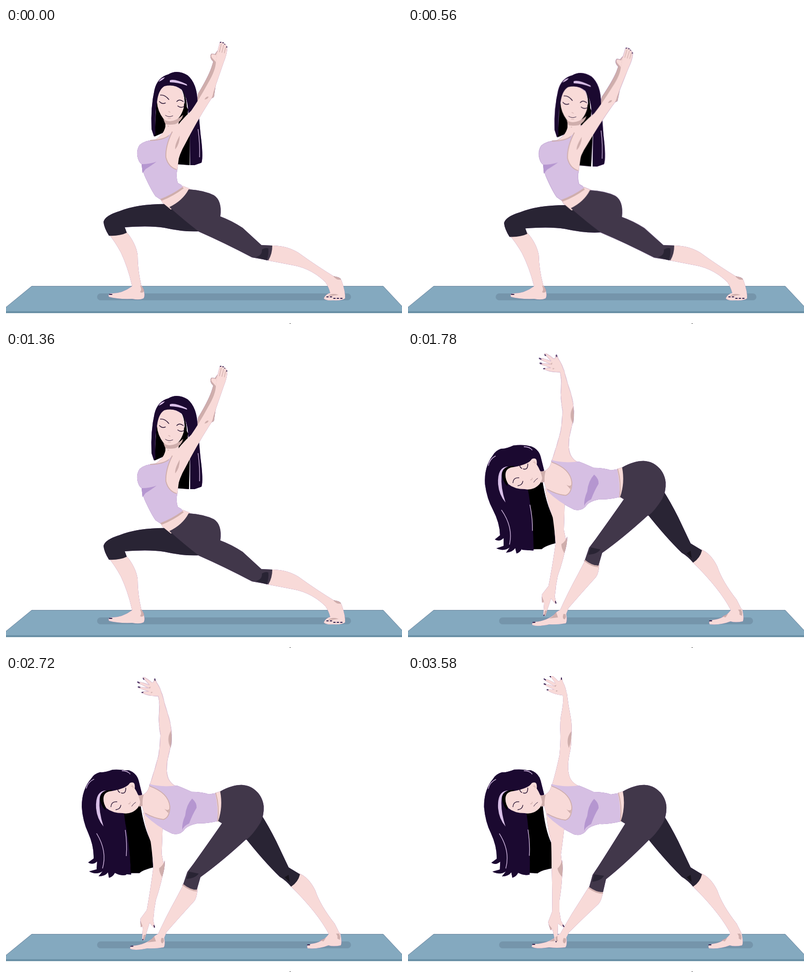
Write an HTML page without scripts that moves like this. It is 800 px wide and 600 px high and loops after 3.6 s.

```html
<!DOCTYPE html>
<html lang="en">
<head>
<meta charset="utf-8">
<title>Yoga flow</title>
<style>
@property --lunge { syntax: "<number>"; inherits: true; initial-value: 0; }
@property --reach { syntax: "<number>"; inherits: true; initial-value: 0; }
@property --sway { syntax: "<number>"; inherits: true; initial-value: 0; }
html, body { margin: 0; width: 100%; height: 100%; overflow: hidden; background: #fff; }
svg {
  display: block; width: 100vw; height: 100vh;
  animation: lunge 3.6s infinite, reach 3.6s infinite, sway 3.6s ease-in-out infinite;
}
.pose { filter: drop-shadow(0 0 .5px #7d4fa3); animation: 3.6s step-end infinite; }
#warrior { animation-name: first; }
#triangle { animation-name: second; }

.skin { fill: #f8dad8; }
.shade { fill: #cfaeac; }
.top { fill: #d6bfe3; }
.fold { fill: #b596d0; }
.near { fill: #41374a; }
.far { fill: #292434; }
.hair { fill: #1b0930; }
.shine { fill: #d9bfe8; }
.line { fill: none; stroke: #24102f; stroke-width: 1.4; stroke-linecap: round; }
.fine { stroke-width: .9; }
.crease { fill: none; stroke: #cfaeac; stroke-width: 1.8; }
.crease.fine { stroke-width: 1.2; }
.thin { fill: none; stroke: #d9bfe8; stroke-width: 1.3; }
.nail { fill: none; stroke: #32204d; stroke-width: 1.9; stroke-linecap: round; }

.shadow { transform-origin: 440.5px 545px; transform: scaleX(calc(1 + .027 * var(--lunge))); }
.hips { transform-origin: 525px 455px; transform: rotate(calc(-.67deg * var(--lunge))); }
.trunk { transform-origin: 335px 340px; transform: translate(calc(-2px * var(--lunge)), calc(2px * var(--lunge))) rotate(calc(.9deg * var(--lunge))); }
.head { transform: translateX(calc(2px * var(--lunge))); }
.panel { transform-origin: 350px 190px; transform: skewX(calc(1.4deg * var(--sway))); }
.arms { transform-origin: 340px 225px; transform: rotate(calc(1.5deg * var(--lunge))) scaleY(calc(1 - .03 * var(--lunge))); }
.thigh { transform: translate(calc(-3px * var(--lunge)), calc(2.3px * var(--lunge))); }
.shin { transform-origin: 270px 525px; transform: rotate(calc(-1.6deg * var(--lunge))); }

.locks { transform-origin: 205px 225px; transform: rotate(calc(-3.5deg * var(--sway))); }
.drape { transform-origin: 258px 270px; transform: rotate(calc(-5deg * var(--reach))); }
.high { transform-origin: 316px 215px; transform: rotate(calc(3.6deg * var(--reach))); }
.high2 { transform-origin: 319px 118px; transform: rotate(calc(-13.6deg * var(--reach))); }
.low { transform-origin: 297px 300px; transform: rotate(calc(-7.5deg * var(--reach))); }
.low2 { transform-origin: 301px 387px; transform: rotate(calc(21deg * var(--reach))); }
.low3 { transform-origin: 298px 482px; transform: rotate(calc(9deg * var(--reach))); }
.chest { transform-origin: 345px 222px; transform: scaleY(calc(1 - .025 * var(--reach))); }
.seat { transform: translateX(calc(-2px * var(--reach))); }
.thigh2 { transform-origin: 480px 270px; transform: rotate(calc(4.3deg * var(--reach))); }
.shin2 { transform-origin: 312px 527px; transform: rotate(calc(-6.2deg * var(--reach))); }
.foot2 { transform-origin: 318px 538px; transform: rotate(calc(-5deg * var(--reach))); }
.foot3 { transform: translateX(calc(2px * var(--reach))); }

@keyframes first { 0% { visibility: visible; } 45.5%, 100% { visibility: hidden; } }
@keyframes second { 0% { visibility: hidden; } 45.5%, 100% { visibility: visible; } }
@keyframes lunge {
  0% { --lunge: 0; animation-timing-function: ease; }
  15.3% { --lunge: 1; animation-timing-function: ease; }
  30.5%, 100% { --lunge: 0; }
}
@keyframes reach {
  0%, 45.5% { --reach: 0; animation-timing-function: cubic-bezier(.1, .75, .3, 1); }
  62.2% { --reach: 1; animation-timing-function: cubic-bezier(.7, 0, .9, .25); }
  78.9%, 100% { --reach: 0; }
}
@keyframes sway {
  0%, 33%, 45.5% { --sway: 0; }
  12%, 22% { --sway: -1; }
  40% { --sway: -.8; }
  49.4% { --sway: 1; }
  65%, 83% { --sway: 0; }
  99%, 100% { --sway: .25; }
}
</style>
</head>
<body>
<svg viewBox="0 0 800 600">
  <path fill="#84a9bf" d="M52 523H762L800 564V575H0V566z"/>
  <path fill="#6a90a6" d="M0 574H800V578H0z"/>
  <path fill="none" stroke="#5f7792" stroke-width=".8" d="M0 566L52 523.4H762L800 564"/>
  <rect class="shadow" x="184" y="538" width="513" height="14" rx="7" fill="#7595ab"/>
  <path fill="#222" d="M573 599h2v1h-2z"/>

  <g id="warrior" class="pose">
    <g class="shin">
      <path class="skin" d="M207 417Q228 415 243 413Q262 435 266 460Q266 490 273 520L276 532H256L254 520Q246 485 232 455Q220 433 207 417z"/>
    </g>
    <path class="skin" d="M254 524Q262 517 274 522Q283 540 278 548Q270 552 255 549Q225 550 208 545Q205 538 214 538Q235 538 254 524z"/>
    <path class="shade" d="M273 522Q281 531 278 535Q273 538 271 535Q275 530 271 523z"/>
    <path class="nail" d="M209 540h5"/>
    <path class="far thigh" d="M335 357Q270 355 230 371Q200 380 197 393Q198 405 208 421Q230 422 244 415L240 404Q290 400 320 405Q360 414 392 412L375 385z"/>

    <path class="skin" d="M534 441Q565 440 590 455Q630 484 665 505L677 512L650 520Q620 488 580 481L528 471z"/>
    <path class="skin" d="M645 515L660 503Q676 506 678 512Q686 535 685 548Q680 553 660 552Q645 553 642 548Q645 540 655 537Q652 525 645 515z"/>
    <path class="shade" d="M661 503Q676 505 677 510Q668 512 661 503zM650 543Q660 536 672 541L658 543z"/>
    <path class="nail" stroke-dasharray="3 4" d="M648 545h10m4 3h18"/>

    <g class="trunk">
      <g class="head">
        <path class="panel" d="M350 180L370 180L372 200L371 278L345 276L352 240z"/>
        <path d="M304 145L300 220L318 212L330 195H365L368 165L340 120z"/>
      </g>
      <path class="skin" d="M322 186H350Q346 200 352 240L346 289L322 280L298 228Q318 218 322 200z"/>
      <g class="arms">
        <path class="shade" d="M384 160L388 133Q408 100 415 80L420 64L432 60L420 140z"/>
        <path class="shade" d="M425 76L415 64Q411 57 415 52L422 53L427 46V70z"/>
        <path class="skin" d="M424 69L416 60Q413 55 417 53L424 55L427 47z"/>
      </g>
      <g class="head">
        <path class="skin" d="M305 150Q305 126 320 117Q340 112 355 127Q362 145 359 162Q352 186 335 192Q324 192 318 184Q306 168 305 150z"/>
        <path class="shade" d="M318 185Q335 196 358 176Q355 189 342 195Q330 197 322 195zM326 199l3 1v-2z"/>
        <path class="hair" d="M305 150Q308 125 320 118Q340 113 355 125Q366 140 368 165L372 205V278L381 278L395 273Q399 260 393 215L387 150Q386 112 367 96Q346 83 328 94Q306 100 300 125Q292 160 294 205L299 220L302 215Q300 175 305 150z"/>
        <path class="shine" d="M308 109Q313 101 321 100Q317 106 308 109zM331 106Q340 102 365 114L366 117Q347 110 331 110z"/>
        <path class="thin" d="M388 205Q392 235 391 262"/>
        <path d="M355 124Q367 142 365 170L358 172Q365 145 355 124z"/>
        <path class="line" d="M312 136Q321 135 329 145M345 149Q350 143 358 149M310 149Q315 155 322 152M347 158Q353 163 360 159"/>
        <path class="line fine" d="M322 177Q329 182 337 178"/>
        <path class="crease fine" d="M328 169l4 2M327 183h6"/>
      </g>
      <path class="skin" d="M311 345L357 320L372 326Q362 354 333 368L316 354z"/>
      <path class="shade" d="M310 346L356 321L359 325Q338 341 315 350z"/>
      <path class="top" d="M270 237Q264 245 265 258Q267 272 275 277Q276 292 282 304Q294 330 302 341L311 347Q335 338 357 322L354 318L347 314Q343 301 346 287Q328 282 323 262Q322 238 336 210Q326 224 300 227Q282 227 270 237z"/>
      <path class="crease" d="M336 210Q322 238 323 262Q328 282 345 287M291 228Q318 227 329 218"/>
      <path class="fold" d="M274 276Q290 276 304 271Q292 280 282 286L276 294z"/>
      <g class="arms">
        <path class="skin" d="M424 68Q424 85 408 112Q390 145 374 168Q352 188 338 210L330 250L345 280Q350 255 362 235Q385 190 411 149Q417 142 419 130L440 69Q447 52 447 39L445 35L441 31L437 28L432 29L427 48z"/>
        <path class="shade" d="M401 145Q404 138 409 139Q409 144 401 145zM342 246Q340 238 351 218Q351 235 342 246z"/>
        <path class="crease fine" d="M431 49L435 32M436 50L440 34M441 51L444 38"/>
        <path class="nail" d="M433 29h1M438 30h1M442 33h0M446 38v1"/>
      </g>
    </g>
    <g class="hips">
      <path class="near" d="M369 327Q400 329 420 339Q437 350 433 382Q455 390 478 405L516 440L538 441Q538 458 530 471L497 465Q440 435 390 413Q360 390 330 363Q357 350 369 327z"/>
      <path class="far" d="M517 449Q525 444 530 447Q531 460 527 471L505 464Q518 461 517 449z"/>
    </g>
  </g>

  <g id="triangle" class="pose">
    <g class="drape">
      <path class="hair" d="M205 270H245V402L222 399z"/>
      <path d="M236 275L272 260Q276 310 290 340V390Q268 394 262 400L244 399Q247 340 236 275z"/>
    </g>
    <g class="locks">
      <path class="hair" d="M262 203Q250 188 215 190Q200 196 190 195Q178 198 172 208Q153 230 153 265Q155 295 166 318Q178 345 177 370L166 378Q175 384 184 376L183 392L168 396Q182 404 195 396L187 406Q200 406 206 398L208 409Q216 407 220 399Q232 406 243 403Q246 350 240 290L238 275L250 240L262 203z"/>
      <path class="thin" d="M183 319Q205 355 195 390M162 228Q165 215 178 209M241 312Q245 340 243 365"/>
    </g>
    <path class="hair" d="M225 192L248 191Q264 197 268 212L275 240L271 244L250 228z"/>
    <path class="thin" d="M234 192Q246 192 251 199"/>
    <path class="shine" d="M203 232Q190 235 189 250Q187 275 197 305Q184 290 182 268Q180 232 203 232z"/>
    <path d="M190 245Q194 230 215 231L200 250L201 272Q190 262 190 245z"/>
    <g class="foot3">
      <path class="skin" d="M652 521Q665 512 674 522Q678 540 675 546Q660 549 650 546Q630 554 608 552Q604 545 615 543Q640 540 652 521z"/>
      <path class="shade" d="M667 518Q676 524 673 535L668 532Q670 526 663 520zM633 536L645 531L640 538z"/>
      <path class="nail" d="M608 545h4"/>
    </g>
    <path class="skin" d="M592 400Q612 408 625 435Q635 465 664 502L674 522L652 523Q630 480 574 425z"/>
    <path class="far" d="M515 280Q530 303 546 335L571 388L594 402Q590 418 576 427Q565 414 553 407Q520 375 480 324z"/>
    <path fill="#17131c" d="M563 408L571 403L573 418z"/>

    <g class="low">
      <path class="skin" d="M279 275Q292 280 317 298Q312 340 309 362L312 390H290Q290 350 289 335Q282 310 279 275z"/>
      <g class="low2">
        <path class="skin" d="M290 380L312 384Q312 420 306 455V485H291Q292 440 290 380z"/>
        <path class="shade" d="M311 373Q314 390 311 407Q303 398 302 390Q309 384 311 373z"/>
      </g>
    </g>
    <g class="foot2">
      <path class="skin" d="M301 526Q315 516 320 530Q322 545 318 550Q300 552 285 550Q260 554 250 549Q249 542 262 543Q288 540 301 526z"/>
      <path class="shade" d="M317 526Q322 538 316 542Q311 540 314 532zM285 538Q294 534 300 526L303 537z"/>
      <path class="nail" d="M252 544h4"/>
    </g>
    <g class="shin2">
      <path class="skin" d="M365 428Q380 437 394 437Q391 456 385 462Q350 495 325 520L319 532L304 529Q325 490 350 452z"/>
    </g>
    <g class="low">
      <g class="low2">
        <g class="low3">
          <path class="skin" d="M291 478H306L309 496L316 508L313 509L303 502L302 538Q299 542 297 537L292 514L288 515L283 499z"/>
          <path class="shade" d="M284 503L291 512L288 515zM298 529l4-2v11l-3 2z"/>
          <path class="nail" d="M313 505l2 3M299 538v1"/>
        </g>
      </g>
    </g>

    <g class="high">
      <path class="skin" d="M290 224Q300 190 306 160Q308 140 308 115H330Q331 140 326 160Q320 190 328 208Q334 219 348 224Q315 232 290 224z"/>
      <g class="high2">
        <path class="skin" d="M308 122Q306 90 311 70Q315 50 312 35H321Q324 60 329 85Q332 105 330 122z"/>
        <path class="shade" d="M330 112Q331 130 325 146Q318 127 330 112z"/>
        <path class="skin" d="M321 40L312 39Q296 38 281 29Q280 25 296 28L275 18Q274 14 296 21L275 8Q277 3 298 15L286-2Q289-5 303 10Q308 12 308 4Q311 2 313 12Q320 25 321 40z"/>
        <path class="nail" d="M275 6l3 2M275 16l3 1M281 28h2M287 0l1 2M310 4v3"/>
        <path class="shade" d="M295 20l5-2l-2 4zM299 29l4 1l-4 2z"/>
      </g>
    </g>
    <path class="skin" d="M264 243Q287 243 290 219Q345 230 334 270Q330 298 314 294Q292 288 279 277L275 264z"/>
    <path class="shade" d="M267 242L278 241Q275 252 276 263L269 265z"/>
    <path class="skin" d="M197 247Q198 234 215 233Q245 227 250 217Q262 212 260 228Q268 240 271 255Q270 268 255 276Q245 280 236 278Q215 278 203 268Q196 258 197 247z"/>
    <path class="line" d="M212 265Q213 254 224 255M222 271Q231 270 232 262M226 227Q225 234 230 236M233 237Q242 240 242 227"/>
    <path class="line fine" d="M254 264Q257 259 262 256"/>
    <path class="crease fine" d="M247 259q4 1 4-4M253 224q4-4 4 3"/>

    <g class="chest">
      <path class="top" d="M290 219Q315 226 345 222Q358 227 375 235Q395 235 410 240L434 236L429 295Q405 301 387 300Q368 304 362 311Q352 326 335 321Q305 307 281 283V278Q300 290 318 292Q331 288 331 265Q328 238 290 224z"/>
      <path class="crease" d="M290 223Q328 237 331 265Q331 288 318 292Q300 290 281 279"/>
      <path class="shade" d="M320 270Q327 275 330 270L328 279z"/>
      <path class="fold" d="M376 249Q386 258 385 268Q377 281 370 300Q358 306 356 314Q355 300 362 284Q364 262 376 249z"/>
    </g>
    <g class="seat">
      <path class="skin" d="M424 237L440 232L436 295L428 295Q431 270 424 237z"/>
      <path class="crease" d="M425 237Q433 265 429 295"/>
      <path class="near" d="M434 234C452 224 468 220 480 221C500 222 520 240 522 264Q523 282 515 298Q500 322 487 332L440 300L430 294Q440 265 434 234z"/>
    </g>
    <g class="thigh2">
      <path class="near" d="M442 294Q420 330 385 385L373 403L366 428Q380 439 394 438L400 412Q440 380 487 332Q514 310 514 275L480 255L442 275z"/>
      <path class="far" d="M376 402L396 405Q390 415 372 417z"/>
      <path class="crease" style="stroke-width:3" d="M365 429Q380 440 394 440"/>
    </g>
  </g>
</svg>
</body>
</html>
```
